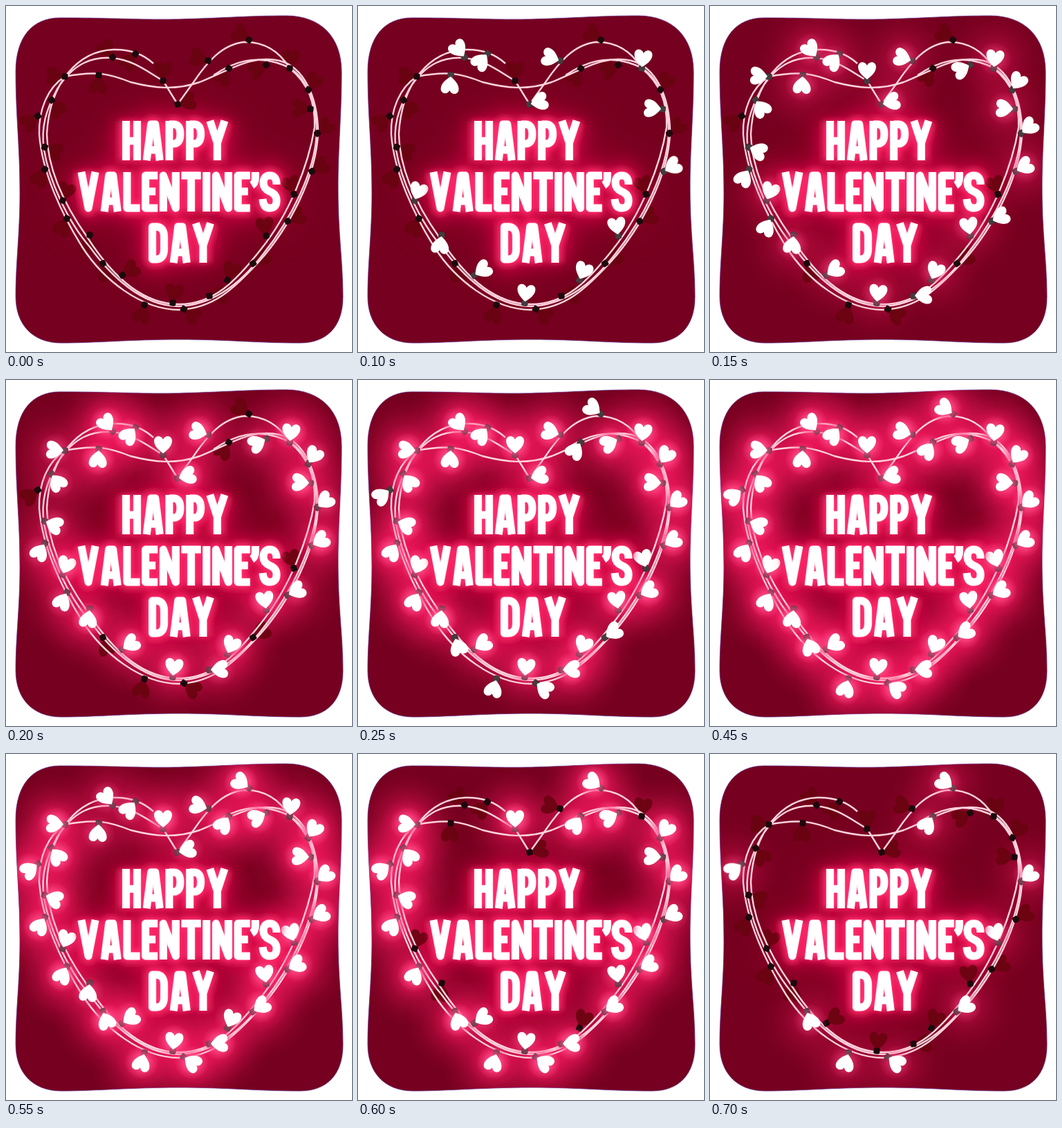
Animation, 500 px wide and 500 px high, one loop 0.75 s. Source, as an HTML page:

```html
<!DOCTYPE html>
<html lang="en">
<head>
<meta charset="utf-8">
<title>Happy Valentine's Day</title>
<style>
  html, body { margin: 0; width: 100%; height: 100%; overflow: hidden; background: #fff; }
  svg { display: block; width: 100vw; height: 100vh; }
</style>
</head>
<body>
<svg id="stage" viewBox="0 0 500 500" role="img" aria-label="Happy Valentine's Day"></svg>
<script>
const LOOP = 750, STEP = 50, FADE = 100;

const CARD = "M78 17C160 17 180 20 250 19C320 17 350 14 405 14C455 14 485 45 485 95" +
  "C485 160 480 200 480 265C480 330 487 370 487 420C487 465 462 487 425 487" +
  "C360 487 320 482 250 482C180 482 130 487 80 487C38 487 14 460 14 420" +
  "C14 370 20 330 20 270C20 200 14 160 14 95C14 45 38 17 78 17Z";

const WIRES = [
  "M85 102C60 118 47 150 48 185C52 240 80 300 110 348C140 395 195 439 250 439" +
  "C300 437 330 408 365 370C410 320 449 245 451 182C450 130 430 88 395 79" +
  "C355 70 325 92 280 110C245 122 215 119 180 110C150 98 130 93 85 102",
  "M213 83Q190 62 155 63C105 65 63 110 59 185C60 235 84 287 118 335" +
  "C152 388 195 431 250 431C300 431 332 398 368 352C410 300 437 230 446 175" +
  "C447 140 437 112 410 90C393 62 370 52 345 52C312 55 290 82 271 110L248 142" +
  "L227 108C200 92 185 79 154 75C125 73 98 82 74 120C58 150 50 175 55 208" +
  "C62 250 88 310 121 348C150 388 195 434 250 434",
  "M250 434C300 432 340 400 372 358C412 308 446 240 449 184" +
  "C449 130 428 95 400 85C360 70 330 80 300 100"
];

// Bulb groups: switch-on and switch-off time, then cap x, cap y and angle per bulb
const GROUPS = [
  { on: 100, off: 600, bulbs: [154,74,-37, 187,69,-140, 134,100,184, 248,142,75, 292,79,-73,
    410,90,7, 82,281,20, 121,331,-172, 320,396,23] },
  { on: 100, off: 650, bulbs: [440,149,-86, 442,239,60, 376,332,-8, 168,389,57, 241,429,7] },
  { on: 150, off: 700, bulbs: [85,102,-86, 66,136,145, 56,204,112, 56,236,-150, 88,307,-153,
    227,108,0, 376,85,-117, 437,121,33, 407,311,63, 294,419,86] },
  { on: 150, off: 750, bulbs: [450,184,50] },
  { on: 250, off: 750, bulbs: [351,49,-55, 322,90,-146, 46,159,-126, 416,272,-16, 357,372,56,
    140,372,160, 200,432,-164, 257,438,124] }
];

const HEART = "M0 13C-7 8 -13 2 -13 -5C-13 -13 -3 -14 0 -7C3 -14 13 -13 13 -5C13 2 7 8 0 13Z";

// Condensed display lettering: advance width and centre-line strokes
const GLYPHS = {
  H: [27, "M5.5 0V57M21.5 0V57M5.5 29H21.5"],
  A: [30, "M5.5 57L12 5H18L24.5 57M8 42H22"],
  P: [27, "M5.5 0V57M5.5 5H12Q21.5 5 21.5 19T12 33H5.5"],
  Y: [31, "M5 0L15.5 32L26 0M15.5 29V57"],
  V: [30, "M5 0L15 52L25 0"],
  L: [24, "M5.5 0V52H24"],
  E: [23, "M23 5H5.5V52H23M5.5 28H20"],
  N: [29, "M5.5 57V5L23.5 52V0"],
  T: [28, "M0 5H28M14 5V57"],
  I: [11, "M5.5 0V57"],
  "’": [9, "M5 0V8Q5 16 0 19"],
  S: [28, "M24 18Q24 5 14 5Q5 5 5 16Q5 24 14 28Q24 32 24 41Q24 52 14 52Q5 52 4 39"],
  D: [28, "M5.5 5H11Q22.5 5 22.5 20V37Q22.5 52 11 52H5.5Z"]
};
const LINES = [["HAPPY", 168, 166], ["VALENTINE’S", 104, 240], ["DAY", 206, 314]];

function lettering(attrs) {
  let out = "";
  for (const [word, x0, y] of LINES) {
    let x = x0;
    for (const ch of word) {
      const [w, d] = GLYPHS[ch];
      out += `<path d="${d}" transform="translate(${x.toFixed(1)} ${y})"/>`;
      x += w + 2.7;
    }
  }
  return `<g fill="none" stroke-linejoin="round" ${attrs}>${out}</g>`;
}

const blur = (id, s) => `<filter id="${id}" filterUnits="userSpaceOnUse" x="0" y="0" width="500" height="500">
  <feGaussianBlur stdDeviation="${s}"/></filter>`;

const radial = (id, color, stops) => `<radialGradient id="${id}">` + stops.map(([at, a]) =>
  `<stop offset="${at}" stop-color="${color}" stop-opacity="${a}"/>`).join("") + "</radialGradient>";

function eachBulb(group, draw) {
  let out = "";
  for (let i = 0; i < group.bulbs.length; i += 3) {
    const [x, y, a] = group.bulbs.slice(i, i + 3);
    out += `<g transform="translate(${x} ${y}) rotate(${a})">${draw}</g>`;
  }
  return out;
}

const layer = (name, draw) => GROUPS.map(g =>
  `<g class="${name}">${eachBulb(g, draw)}</g>`).join("");

const heart = fill => `<path d="${HEART}" transform="translate(0 -15)" ${fill}/>`;
const disc = (r, id) => `<circle cy="-14" r="${r}" fill="url(#${id})"/>`;
const cap = fill => `<rect x="-4.5" y="-4.5" width="9" height="9" rx="2.5" fill="${fill}"/>`;

const stage = document.getElementById("stage");
stage.innerHTML = `<defs>
    <clipPath id="card"><path d="${CARD}"/></clipPath>
    ${blur("near", 4)}${blur("mid", 12)}${blur("far", 26)}
    ${radial("wide", "#ff1a64", [[0, .9], [.25, .62], [.5, .28], [.75, .09], [1, 0]])}
    ${radial("halo", "#ff4d88", [[0, .9], [.45, .75], [.7, .35], [1, 0]])}
  </defs>
  <path d="${CARD}" fill="#76001f" stroke="#6a3a9a" stroke-width=".7"/>
  <g clip-path="url(#card)">
    ${lettering('stroke="#b00536" stroke-width="56" opacity=".6" filter="url(#far)"')}
    ${layer("glow", disc(76, "wide"))}
    ${lettering('stroke="#e60f50" stroke-width="32" opacity=".8" filter="url(#mid)"')}
    ${layer("dark", heart('fill="#690310" fill-opacity=".9"'))}
    <g fill="none" stroke="#ffd3df" stroke-width="2.4" stroke-linejoin="round">
      ${WIRES.map(d => `<path d="${d}"/>`).join("")}
    </g>
    ${layer("cap", cap("#1c090c"))}
    ${layer("lit", cap("#473a3e"))}
    ${layer("glow", disc(25, "halo"))}
    ${layer("lit", heart('fill="#fff"'))}
    ${lettering('stroke="#ff2a6c" stroke-width="19" filter="url(#near)"')}
    ${lettering('stroke="#ffc4d8" stroke-width="11.4"')}
    ${lettering('stroke="#fff" stroke-width="10.2"')}
  </g>`;

const glows = [...stage.querySelectorAll(".glow")];
const lits = [...stage.querySelectorAll(".lit")];
const clamp = v => Math.max(0, Math.min(1, v));

function draw(ms) {
  const t = Math.floor(ms % LOOP / STEP) * STEP;
  const state = GROUPS.map(({ on, off }) => ({
    lit: t >= on && t < off,
    glow: clamp(Math.min(t - on, off - t) / FADE)
  }));
  glows.forEach((el, i) => el.setAttribute("opacity", state[i % GROUPS.length].glow));
  lits.forEach((el, i) =>
    el.setAttribute("visibility", state[i % GROUPS.length].lit ? "visible" : "hidden"));
}

let start;
function tick(now) {
  start ??= now;
  draw(now - start);
  requestAnimationFrame(tick);
}
draw(0);
requestAnimationFrame(tick);
</script>
</body>
</html>
```
